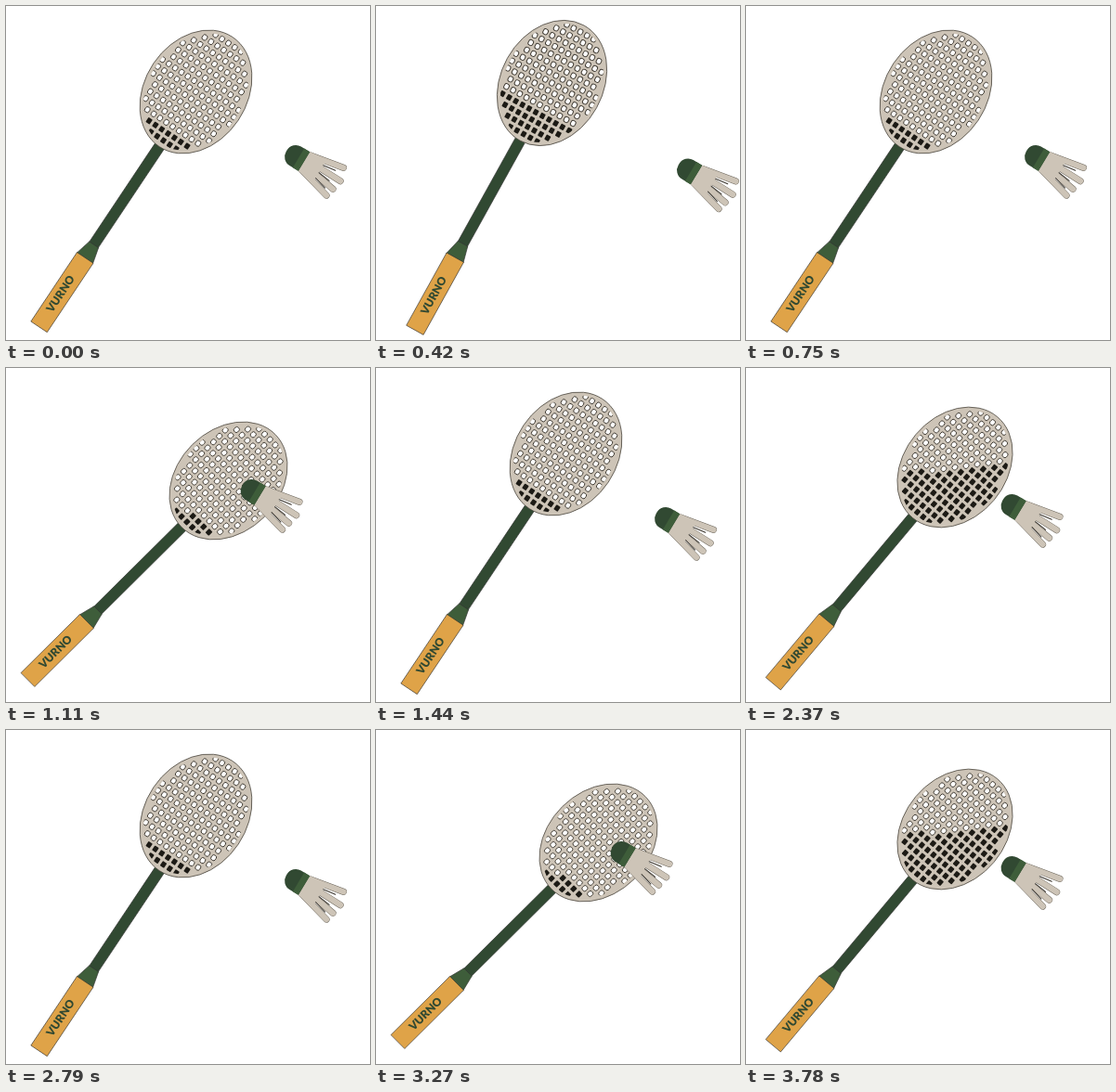
Animation, 392 px wide and 360 px high, one loop 4.08 s. Source, as an HTML page with a canvas:

```html
<!DOCTYPE html>
<html lang="en">
<head>
<meta charset="utf-8">
<title>Badminton</title>
<style>
  html, body { margin: 0; width: 100%; height: 100%; overflow: hidden; background: #fff; }
  canvas { display: block; }
</style>
</head>
<body>
<canvas id="stage" width="392" height="360"></canvas>
<script>
const ctx = document.getElementById('stage').getContext('2d');
const LOOP = 4080, LAST = 3780, HOLD = 180, OFFSET = 300;
const CREAM = '#cdc4b7', INK = '#1c1a15', GREEN = '#314932', LEAF = '#3e5d3a', ORANGE = '#dfa348';
const rad = deg => deg * Math.PI / 180;

// Head centre, racket angle, shuttle position; cells are dark where x < slope * y + limit
const poses = [
  { head: [189.5, 83], angle: 61, shuttle: [345, 182], slope: 0, limit: -33 },
  { head: [204.5, 92.5], angle: 56.3, shuttle: [321, 167.5], slope: 0, limit: -47 },
  { head: [225, 107], angle: 50, shuttle: [295.5, 153.5], slope: 1, limit: -2 },
  { head: [239.5, 121.5], angle: 44.8, shuttle: [273.5, 137.5], slope: 0.2, limit: -53 },
];

function shape(points, fill) {
  ctx.beginPath();
  points.forEach(([x, y]) => ctx.lineTo(x, y));
  ctx.closePath();
  ctx.fillStyle = fill;
  ctx.fill();
  ctx.strokeStyle = '#333';
  ctx.lineWidth = 0.6;
  ctx.stroke();
}

function ellipse(a, b, color, width) {
  ctx.beginPath();
  ctx.ellipse(0, 0, a, b, 0, 0, 2 * Math.PI);
  if (width) {
    ctx.strokeStyle = color;
    ctx.lineWidth = width;
    ctx.stroke();
  } else {
    ctx.fillStyle = color;
    ctx.fill();
  }
}

function drawStrings({ slope, limit }) {
  ctx.strokeStyle = '#3b362e';
  ctx.lineWidth = 0.9;
  for (let x = -63; x <= 63; x += 9) {
    for (let y = -49.2; y <= 50; y += 8.2) {
      if ((x / 67) ** 2 + (y / 51) ** 2 > 1) continue;
      const dark = x < slope * y + limit;
      ctx.beginPath();
      ctx.roundRect(x - 3, y - 2.6, 6, 5.2, dark ? 0.8 : 2.2);
      ctx.fillStyle = dark ? INK : '#fff';
      ctx.fill();
      if (!dark) ctx.stroke();
    }
  }
}

function drawRacket(pose) {
  ctx.save();
  ctx.translate(...pose.head);
  ctx.rotate(-rad(pose.angle));
  shape([[-200, -5.8], [-68, -5.8], [-68, 5.8], [-200, 5.8]], GREEN);
  shape([[-216, -10.5], [-198, -6], [-198, 6], [-216, 10.5]], LEAF);
  shape([[-304.5, -10.5], [-215, -10.5], [-215, 10.5], [-304.5, 10.5]], ORANGE);
  ctx.fillStyle = GREEN;
  ctx.font = '900 12px Lato, sans-serif';
  ctx.textAlign = 'center';
  ctx.textBaseline = 'middle';
  ctx.fillText('VURNO', -262, 0);
  ellipse(71, 55, CREAM);
  drawStrings(pose);
  ellipse(69, 53, CREAM, 3.6);
  ellipse(71, 55, '#45413a', 0.7);
  ctx.restore();
}

function drawShuttle([x, y]) {
  const tips = [[40, -16], [44.5, -2], [42, 9.5], [39.5, 19]];
  const feathers = (color, width) => {
    ctx.strokeStyle = color;
    ctx.lineWidth = width;
    ctx.beginPath();
    tips.forEach(([tx, ty], i) => {
      ctx.moveTo(2, i * 6 - 9);
      ctx.lineTo(tx, ty);
    });
    ctx.stroke();
  };
  ctx.save();
  ctx.translate(x, y);
  ctx.rotate(rad(31));
  ctx.lineCap = 'round';
  feathers('#6b655b', 7);
  feathers(CREAM, 6.2);
  ctx.fillStyle = CREAM;
  ctx.beginPath();
  [[0, -12], [20, -14], [20, 14.5], [0, 12]].forEach(p => ctx.lineTo(...p));
  ctx.fill();
  ctx.strokeStyle = '#39342c';
  ctx.lineWidth = 1;
  ctx.beginPath();
  [[-7, -9], [2, 4], [9, 13]].forEach(([from, to]) => {
    ctx.moveTo(20, from);
    ctx.lineTo(34, to);
  });
  ctx.stroke();
  ctx.fillStyle = GREEN;
  ctx.beginPath();
  ctx.roundRect(-22, -12, 22, 24, [11, 0, 0, 11]);
  ctx.fill();
  ctx.fillStyle = LEAF;
  ctx.fillRect(-7, -12, 7, 24);
  ctx.restore();
}

function draw(now) {
  const t = Math.min(now % LOOP, LAST);
  const pose = poses[Math.floor((t + OFFSET) / HOLD) % poses.length];
  ctx.fillStyle = '#fff';
  ctx.fillRect(0, 0, 392, 360);
  drawRacket(pose);
  drawShuttle(pose.shuttle);
  requestAnimationFrame(draw);
}
requestAnimationFrame(draw);
</script>
</body>
</html>
```
